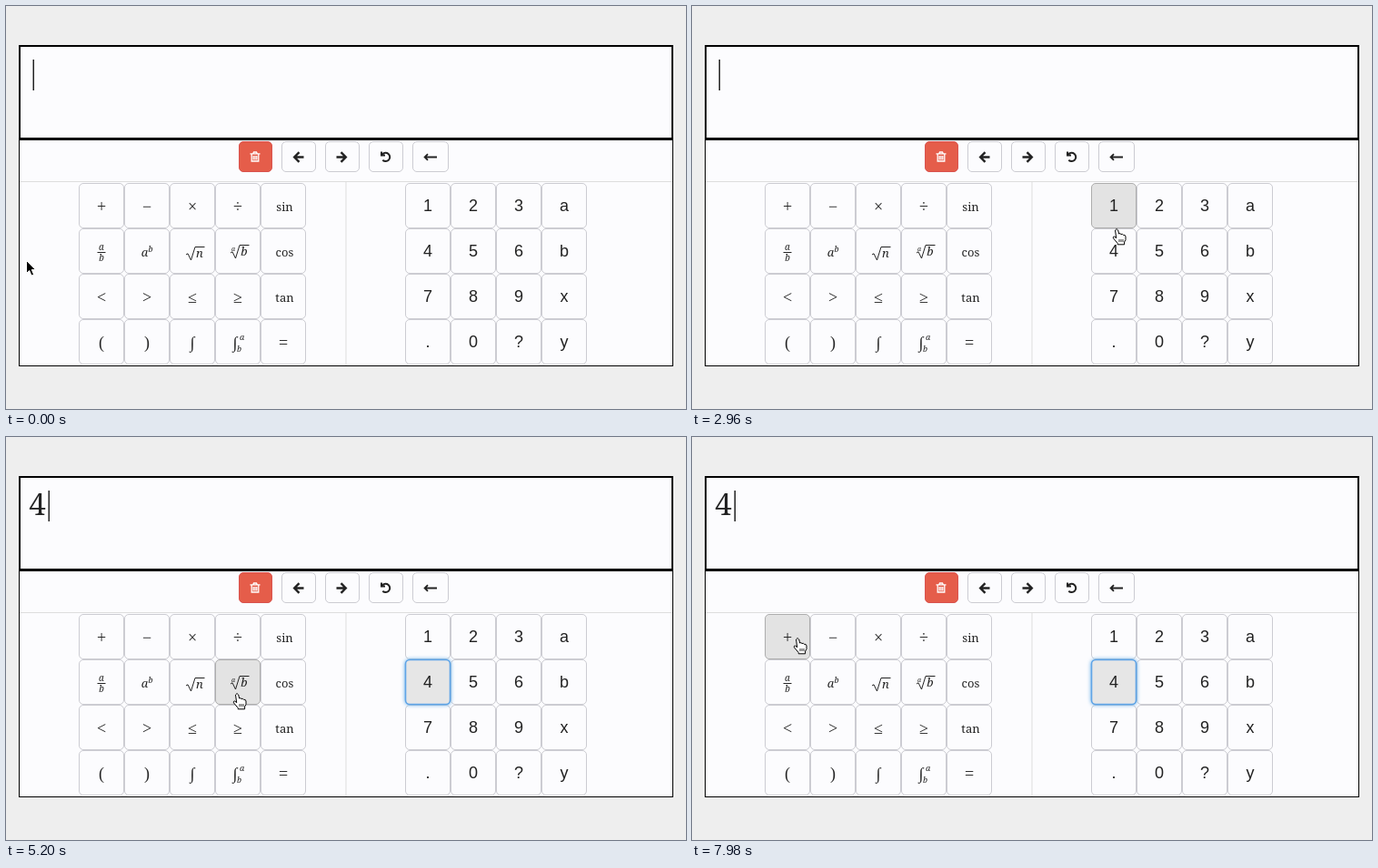
An HTML page for the animation above (8000 ms loop, 748 by 444 pixels).

```html
<!DOCTYPE html>
<html lang="en">
<head>
<meta charset="utf-8">
<title>Math keypad</title>
<style>
html, body { margin: 0; width: 100%; height: 100%; overflow: hidden; background: #eee; }
svg { display: block; width: 748px; height: 444px; }
text { fill: #222; text-anchor: middle; }
.sans { font-family: "Liberation Sans", sans-serif; }
.op { font-family: "Liberation Serif", serif; }
.serif { font-family: "Noto Serif", serif; }
.it { font-style: italic; }
.ink { fill: none; stroke: #222; }
.key { fill: #fcfcfe; stroke: #ccccd2; }
.key.hover { fill: #e3e3e3; stroke: #adadad; }
.key.focus { fill: #e6e6e6; stroke: #5fa4e6; stroke-width: 1.6; filter: drop-shadow(0 0 2px #66afe9); }
.key.danger { fill: #e55d4a; stroke: #d9534f; }
.key.danger.hover { fill: #c9302c; }
</style>
</head>
<body>
<svg viewBox="0 0 748 444">
  <rect x="14.5" y="44.5" width="719" height="352" fill="#fcfcfe" stroke="#000"/>
  <path d="M15 193.5H733M374 194V396" stroke="#ddd"/>
  <rect x="15" y="44" width="718" height="102" fill="#fcfcfe" stroke="#000" stroke-width="2"/>
  <path d="M14 146.5H734" stroke="#000" stroke-width="3"/>
  <g id="keys"></g>
  <g id="labels"></g>
  <text id="entry" class="serif" x="34.5" y="86" font-size="33">4</text>
  <rect id="caret" y="59" width="1.5" height="34" fill="#222"/>
  <g id="cursor">
    <path id="arrow" d="M.5 .5V14.5L3.7 11.5L6 17L8.6 15.9L6.3 10.6H10.5Z" stroke="#fff"/>
    <g id="hand" stroke="#000" stroke-linejoin="round">
      <path d="M-1.5 2Q0-1 1.7 2L2.6 6Q4 5 5 6.5Q6.5 5.7 7.5 7.3Q9.7 6.8 10 9V12.5L8.6 15V17.8H1.2V16.5L-3.6 10.8Q-4.2 8.8-2.3 9L-.3 10.7Z" fill="#fff"/>
      <path d="M3 12V15M5 12V15M7 12V15" stroke-width=".8"/>
    </g>
  </g>
</svg>
<script>
const LOOP = 8000, CLICK = 4460, CELL = 50, TOP = 195;
const $ = id => document.getElementById(id);
const keys = [];

function add(parent, tag, attrs, content = '') {
  const el = document.createElementNS('http://www.w3.org/2000/svg', tag);
  for (const name in attrs) el.setAttribute(name, attrs[name]);
  el.textContent = content;
  return parent.appendChild(el);
}

function addKey(x, y, w, h, kind = '') {
  const el = add($('keys'), 'rect',
    { x: x + .5, y: y + .5, width: w - 1, height: h - 1, rx: 4.5, class: 'key ' + kind });
  const key = { el, x, y, w, h };
  keys.push(key);
  return key;
}

const label = (x, y, str, size, style) =>
  add($('labels'), 'text', { x, y, class: style, 'font-size': size }, str);
const italic = (x, y, str, size = 13) => label(x, y, str, size, 'serif it');
const ink = (x, y, d, width = 1) =>
  add($('labels'), 'path', { d, class: 'ink', 'stroke-width': width, transform: `translate(${x} ${y})` });

// Calls visit(symbol, key, centreX, top) for each key of a pad
function addPad(left, rows, visit) {
  rows.forEach((symbols, row) => symbols.forEach((symbol, col) => {
    const x = left + col * CELL, y = TOP + row * CELL;
    visit(symbol, addKey(x, y, CELL, CELL), x + CELL / 2, y);
  }));
}

// Toolbar
addKey(256, 149, 37, 34, 'danger');
for (let i = 0; i < 4; i++) addKey(303 + 48 * i, 149, i < 3 ? 38 : 40, 34);
ink(274, 166, 'M-5.5-3.2H5.5M-2.2-3.5L-1.5-5H1.5L2.2-3.5M-3.8-3V5H3.8V-3M-1.8-1V3.5M0-1V3.5M1.8-1V3.5', 1.3)
  .style.stroke = '#fff';
ink(322, 166.5, 'M5.5 0H-4.5M.5-5.3L-4.8 0L.5 5.3', 2.4);
ink(369, 166.5, 'M-5.5 0H4.5M-.5-5.3L4.8 0L-.5 5.3', 2.4);
ink(418, 166.5, 'M-4-3.2A4.7 4.7 0 1 1-3.7 3.3M-5-6V-2H-1', 2);
ink(467, 166.5, 'M7 0H-6M-3-3.3L-6.4 0L-3 3.3', 1.8);

// Function pad: composite symbols are drawn by the functions below
const composites = {
  frac(x, y) {
    italic(x, y + 73 - 49, 'a', 10);
    italic(x, y + 36, 'b', 10);
    ink(x, y + 26.5, 'M-4.5 0H4.5');
  },
  power(x, y) {
    italic(x - 2.5, y + 31, 'a');
    italic(x + 4, y + 26, 'b', 9);
  },
  root(x, y, radicand = 'n') {
    italic(x + 8, y + 32, radicand);
    ink(x + 3, y + 20.5, 'M-10 8.5L-8 7.3L-4.5 14.5L0 0H10.5');
  },
  nthRoot(x, y) {
    composites.root(x - 1, y - 2, 'b');
    italic(x - 5, y + 25, 'a', 7);
  },
  integral(x, y) {
    label(x - 3, y + 32, '∫', 18, 'op');
    italic(x + 4.5, y + 23, 'a', 9);
    italic(x + 1.5, y + 36, 'b', 9);
  }
};
addPad(80, [
  ['+', '−', '×', '÷', 'sin'],
  ['frac', 'power', 'root', 'nthRoot', 'cos'],
  ['<', '>', '≤', '≥', 'tan'],
  ['(', ')', '∫', 'integral', '=']
], (symbol, key, x, y) => {
  if (composites[symbol]) composites[symbol](x, y);
  else if (symbol.length > 1) label(x + 1.5, y + 31, symbol, 13, 'serif');
  else label(x, y + 32, symbol, 18, 'op');
});

// Number pad
let fourKey;
addPad(439, ['123a', '456b', '789x', '.0?y'].map(row => [...row]), (symbol, key, x, y) => {
  if (symbol === '4') fourKey = key;
  label(x, y + 31, symbol, 18, 'sans');
});

// Pointer stops: time, x, y
const stops = [
  [0, 22, 280], [1560, 352, 145], [1800, 375, 123], [2100, 392, 105], [2240, 392, 105],
  [2960, 467, 245], [3850, 463, 350], [4450, 468, 266], [4740, 468, 266],
  [5200, 254, 282], [6560, 238, 335], [LOOP, 114, 219]
];

function pointerAt(t) {
  const i = stops.findIndex(stop => stop[0] > t);
  const [t0, x0, y0] = stops[i - 1], [t1, x1, y1] = stops[i];
  const k = (t - t0) / (t1 - t0);
  return [Math.round(x0 + (x1 - x0) * k), Math.round(y0 + (y1 - y0) * k)];
}

function draw() {
  const t = performance.now() % LOOP;
  const [x, y] = pointerAt(t);
  const clicked = t >= CLICK;
  const hovered = keys.find(k => x >= k.x && x <= k.x + k.w && y >= k.y && y <= k.y + k.h);
  for (const key of keys) {
    key.el.classList.toggle('hover', key === hovered);
    key.el.classList.toggle('focus', clicked && key === fourKey);
  }
  // Keep the active key's border above its neighbours
  const top = clicked ? fourKey : hovered;
  if (top && $('keys').lastChild !== top.el) $('keys').append(top.el);
  $('entry').style.display = clicked ? '' : 'none';
  $('caret').setAttribute('x', clicked ? 46.5 : 29.5);
  $('arrow').style.display = hovered ? 'none' : '';
  $('hand').style.display = hovered ? '' : 'none';
  $('cursor').setAttribute('transform', `translate(${x} ${y})`);
  requestAnimationFrame(draw);
}
requestAnimationFrame(draw);
</script>
</body>
</html>
```
